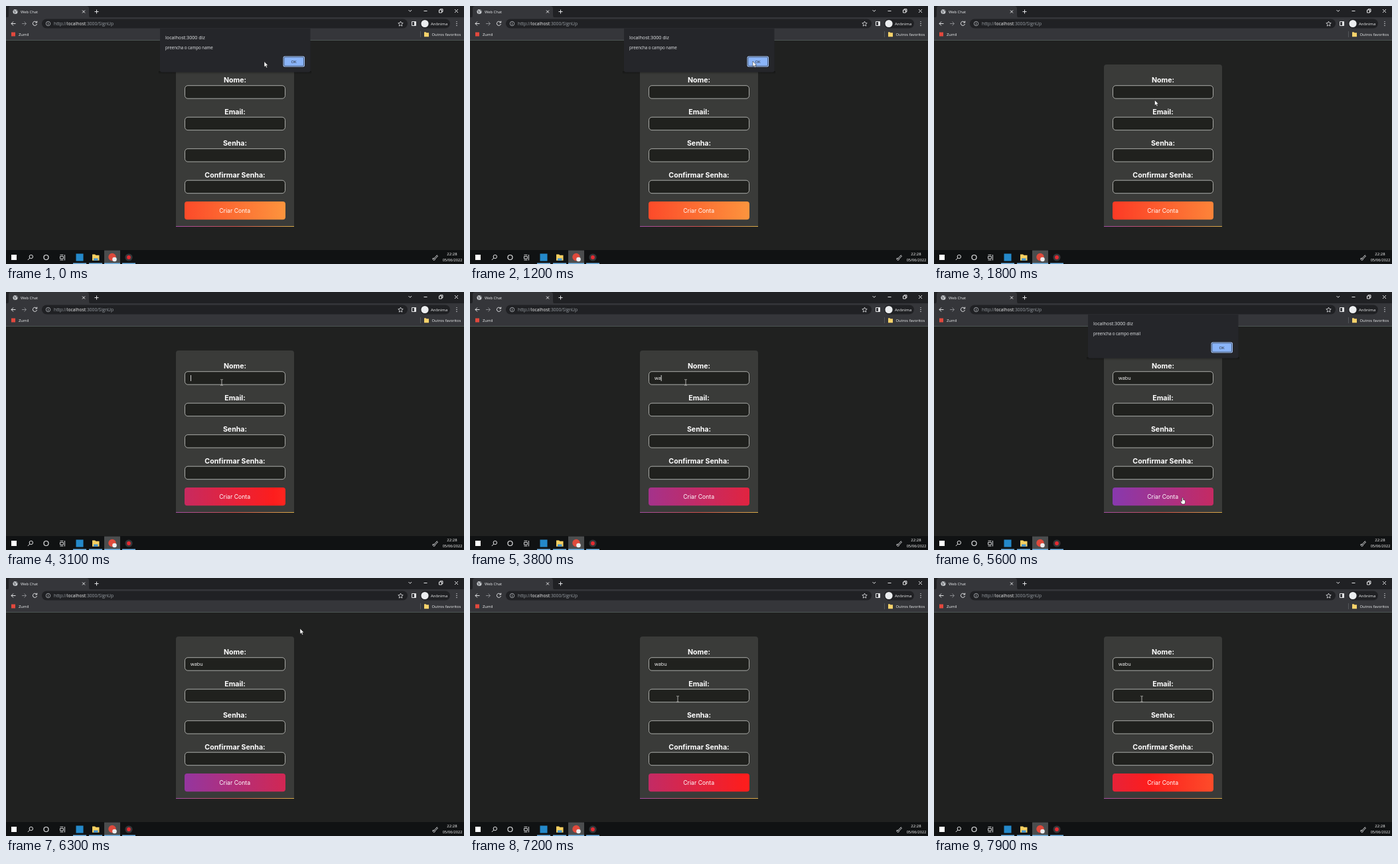
An HTML page for the animation above (8000 ms loop, 690 by 388 pixels).

```html
<!DOCTYPE html>
<html lang="pt-BR">
<head>
<meta charset="utf-8">
<title>Web Chat</title>
<style>
  html, body { margin: 0; width: 100%; height: 100%; overflow: hidden; background: #202120; }
  svg { display: block; width: 690px; height: 388px; font-family: "Open Sans", "Noto Sans", sans-serif; }
  .mid { text-anchor: middle; }
  .label { font: 700 10.6px Inter, sans-serif; fill: #fff; text-anchor: middle; }
  .icon { fill: none; stroke: #e3e4e6; stroke-width: 1; }
</style>
</head>
<body>
<svg viewBox="0 0 690 388" xmlns="http://www.w3.org/2000/svg">
  <defs>
    <linearGradient id="sweep" gradientUnits="userSpaceOnUse" y1="0" y2="0">
      <stop offset="0" stop-color="#833ab4"/>
      <stop offset=".5" stop-color="#fd1d1d"/>
      <stop offset="1" stop-color="#fcb045"/>
    </linearGradient>
    <linearGradient id="rim">
      <stop offset="0" stop-color="#a84fa6"/>
      <stop offset=".5" stop-color="#d0504c"/>
      <stop offset="1" stop-color="#dcae48"/>
    </linearGradient>
    <linearGradient id="shade" x2="0" y2="1">
      <stop offset="0" stop-color="#000" stop-opacity=".35"/>
      <stop offset="1" stop-color="#000" stop-opacity="0"/>
    </linearGradient>
  </defs>

  <rect width="690" height="388" fill="#202120"/>

  <!-- tab strip -->
  <rect width="690" height="18" fill="#202124"/>
  <path d="M1 17.5Q4 17.5 4 14V4Q4 0 8 0H121Q125 0 125 4V14Q125 17.5 128 17.5Z" fill="#35363a"/>
  <circle cx="14" cy="8.5" r="3.6" fill="#c3c6ca"/>
  <path d="M11.5 7L14 8.2L13 11M15 5.5L17 8" fill="none" stroke="#4a4b4f"/>
  <text x="22" y="10.6" font-size="5.8" fill="#e8eaed">Web Chat</text>
  <path class="icon" d="M115 6.5l4 4m0-4l-4 4M133.500 8.500h6m-3-3v6"/>
  <path class="icon" stroke-width=".8" d="M606.500 6l2.300 2.300l2.300-2.300M629.500 7.500h5M652.500 6h4v4h-4zM654 6V4.700h4V8.700h-1.500M676 5l5 5m0-5l-5 5"/>

  <!-- toolbar -->
  <rect y="17" width="690" height="34.500" fill="#35363a"/>
  <rect y="51" width="690" height="1" fill="#4c5553"/>
  <path class="icon" d="M14.500 26.500H8m3-3l-3 3l3 3"/>
  <path class="icon" style="stroke:#85878b" d="M24 26.500h6.500m-3-3l3 3l-3 3"/>
  <path class="icon" d="M46 24.500a3.100 3.100 0 1 0 .5 2.500M46.700 22.600v2.400h-2.400"/>
  <rect x="54" y="19.500" width="551" height="14" rx="7" fill="#202124"/>
  <circle class="icon" style="stroke-width:.8;stroke:#bdc1c6" cx="63.500" cy="26.500" r="3.200"/>
  <path d="M63.500 26v2.300M63.500 24.500v.8" stroke="#bdc1c6" stroke-width=".8"/>
  <text x="72" y="28.900" font-size="6.750" fill="#9aa0a6">http://<tspan fill="#f1f2f3">localhost</tspan>:3000/SignUp</text>
  <path class="icon" style="stroke-width:.8" d="M594.500 23l1.100 2.400l2.600.3l-2 1.800l.6 2.600l-2.300-1.300l-2.300 1.300l.6-2.600l-2-1.800l2.600-.3z"/>
  <path class="icon" d="M611.500 23.500h6v6h-6z"/><path d="M615 23.500h2.500v6H615z" fill="#e3e4e6"/>
  <rect x="624" y="19.500" width="45" height="14" rx="7" fill="#202124"/>
  <circle cx="631" cy="26.500" r="5.600" fill="#eceef0"/>
  <text x="640" y="28.600" font-size="6" fill="#f1f2f3">Anônima</text>
  <path d="M679 23.600v.01M679 26.500v.01M679 29.400v.01" stroke="#e3e4e6" stroke-width="1.400" stroke-linecap="round"/>
  <rect x="8" y="39.500" width="6" height="6" fill="#e2483d"/>
  <text x="19" y="44.600" font-size="5.900" fill="#f1f2f3">Zumil</text>
  <path d="M624.500 38v9" stroke="#5c5e63" stroke-width=".8"/>
  <path d="M630 39.200h2.500l1 1h3.500v6h-7z" fill="#f7d36b"/>
  <text x="641.500" y="44.600" font-size="5.800" fill="#f1f2f3">Outros favoritos</text>

  <!-- form card -->
  <path d="M256 332V92Q256 88 260 88H430Q434 88 434 92V332Z" fill="#3a3b39"/>
  <rect x="256" y="331" width="178" height="1" fill="url(#rim)"/>
  <g id="fields"></g>
  <rect x="269" y="294" width="152" height="27.300" rx="4" fill="url(#sweep)"/>
  <text class="mid" x="344.700" y="310.900" font-size="8.700" fill="#fff" style="font-family:Inter,sans-serif">Criar Conta</text>
  <text id="typed" x="278" y="132.200" font-size="7.300" fill="#fff"></text>
  <rect id="caret" y="125" width=".8" height="9" fill="#fff"/>

  <!-- alert box -->
  <g id="alert">
    <rect x="230" y="98" width="230" height="5" fill="url(#shade)"/>
    <path d="M232 34H458.500V96.500Q458.500 99.500 455.500 99.500H235Q232 99.500 232 96.500Z" fill="#25262a"/>
    <text x="240" y="50.300" font-size="7.200" fill="#e8eaed">localhost:3000 diz</text>
    <text id="message" x="240" y="64.800" font-size="6.200" fill="#e8eaed"></text>
    <rect x="417.500" y="75.500" width="32.500" height="16" rx="2.500" fill="#a9c8fa"/>
    <rect x="418.500" y="76.500" width="30.500" height="14" rx="1.800" fill="#30435f"/>
    <rect x="419.300" y="77.300" width="28.900" height="12.400" rx="1.300" fill="#8ab4f8"/>
    <text class="mid" x="433.500" y="85.500" font-size="5.800" fill="#202124">OK</text>
  </g>

  <!-- taskbar -->
  <rect y="367" width="690" height="21" fill="#101213"/>
  <rect x="8" y="374" width="8" height="8" fill="#fff"/>
  <circle class="icon" cx="37.800" cy="377" r="2.700"/><path class="icon" d="M35.800 379l-3 3"/>
  <circle class="icon" style="stroke-width:1.200" cx="60.500" cy="378" r="3.500"/>
  <path class="icon" style="stroke-width:.9" d="M81.500 376.500h5v3.500h-5zM81.500 374.300h5M81.500 382h5M88.500 374v8.500"/>
  <rect x="105.500" y="372.500" width="11" height="11" fill="#2489ca"/>
  <path d="M130 373.500h4l1.500 1.200h5v8h-10.500z" fill="#f6cf60"/><path d="M132 379.500h6.500v3.200H132z" fill="#3f92d2"/>
  <rect x="148" y="367.500" width="24" height="20.500" fill="#4b4d4e"/>
  <circle cx="160" cy="377.500" r="5.700" fill="#df4a3c"/>
  <circle cx="163.500" cy="381" r="3.300" fill="#eceef0"/>
  <circle cx="185" cy="378" r="5.600" fill="#34373a"/><circle cx="185" cy="378" r="2.900" fill="#e52b32"/>
  <path d="M101 387.300h20M125 387.300h20M148 387.300h24M175 387.300h20" stroke="#76b9ed" stroke-width="1.400"/>
  <path class="icon" style="stroke-width:.9" d="M645 379.500l4.200-4.700l1.300 1.200l-4.200 4.700zM645 379.500q-3-1-2 1.500t3.500 .5"/>
  <g class="mid" fill="#fff">
    <text x="672" y="375.400" font-size="6">22:28</text>
    <text x="672.500" y="384.200" font-size="5.600">05/06/2022</text>
  </g>

  <!-- pointers -->
  <g id="pointer">
    <path id="arrow" d="M0 0V8.200L1.900 6.500L3.200 9.400L4.600 8.800L3.300 6H5.800Z" fill="#fff" stroke="#111" stroke-width=".5"/>
    <path id="beam" d="M-1.800-4.300H-.5L0-3.800L.5-4.300H1.800M0-3.800V3.800M-1.800 4.300H-.5L0 3.800L.5 4.300H1.800" fill="none" stroke="#d6d6d2" stroke-width=".8"/>
    <path id="hand" d="M-1-4.300Q0-5.400 .8-4.300V-1.300Q2-1.900 2.500-.9Q3.700-1.200 4-.2V2.600Q3.800 4 3 5H-1Q-2.200 3-3.300 1Q-2.800-.3-1 1Z" fill="#fff" stroke="#222" stroke-width=".6"/>
  </g>
</svg>
<script>
const LOOP = 8000;
const NAME = "wabu";
const el = id => document.getElementById(id);
const show = (id, on) => el(id).setAttribute("visibility", on ? "visible" : "hidden");

el("fields").innerHTML = ["Nome:", "Email:", "Senha:", "Confirmar Senha:"].map((label, i) => {
  const y = i * 47.5;
  return `<text class="label" x="345" y="${115.4 + y}">${label}</text>
    <rect x="269.500" y="${119.7 + y}" width="151" height="19.500" rx="4.500" fill="#20211e" stroke="#b9bab7" stroke-width=".9"/>`;
}).join("");

// The screen repaints only at these times.
const ticks = [0, 500, 700, 800, 1000, 1200, 1400, 1800, 2000, 2100, 2300, 2400, 2700, 3000, 3100,
  3300, 3600, 3800, 3900, 4000, 4100, 4200, 4400, 4500, 4600, 4800, 5000, 5200, 5300, 5400, 5500,
  5600, 5700, 5800, 5900, 6000, 6100, 6200, 6300, 6600, 6800, 7000];
for (let t = 7200; t < LOOP; t += 100) ticks.push(t);

// Share of the gradient hidden to the left of the button.
const slide = [[0, .655], [1400, .655], [1800, .6], [3100, .28], [3800, .135], [4500, .05],
  [5200, .02], [6100, .02], [6300, .07], [7900, .41]];

// time, x, y, shape
const path = [[0, 389, 83.5, "arrow"], [500, 419, 81, "arrow"], [700, 423, 82, "arrow"],
  [800, 426, 83, "arrow"], [1800, 332.5, 141.5, "arrow"], [2000, 325, 136, "beam"],
  [4400, 340, 185, "beam"], [4500, 358, 258, "arrow"], [4600, 372, 309, "hand"],
  [4800, 374.5, 314, "hand"], [5700, 388, 268, "arrow"], [5800, 412, 180, "arrow"],
  [5900, 434, 104, "arrow"], [6000, 443, 80, "arrow"], [6100, 443, 76, "arrow"],
  [6600, 420, 97, "arrow"], [6800, 340, 182, "beam"], [7000, 313, 182, "beam"]];

const last = (list, test) => list.filter(test).pop();

function lerp(keys, t) {
  const i = keys.findIndex(k => k[0] > t);
  if (i < 0) return keys[keys.length - 1][1];
  const [a, b] = [keys[i - 1], keys[i]];
  return a[1] + (b[1] - a[1]) * (t - a[0]) / (b[0] - a[0]);
}

function caretOn(t) {
  if (t < 2100 || t >= 5300) return false;
  if (t < 3600) return t < 2700 || t >= 3000;
  return t < 4800 || t >= 5200;
}

function draw(now) {
  const t = last(ticks, k => k <= now);

  const left = 269 - lerp(slide, t) * 608;
  el("sweep").setAttribute("x1", left);
  el("sweep").setAttribute("x2", left + 608);

  const count = t < 3600 ? 0 : Math.min(NAME.length, 1 + Math.floor((t - 3600) / 200));
  const typed = el("typed");
  typed.textContent = NAME.slice(0, count);
  el("caret").setAttribute("x", 278 + (count ? typed.getComputedTextLength() : 0));
  show("caret", caretOn(t));

  show("alert", t < 1400 || (t >= 5300 && t < 6200));
  el("message").textContent = "preencha o campo " + (t < 1400 ? "name" : "email");

  const [, x, y, shape] = last(path, p => p[0] <= t);
  el("pointer").setAttribute("transform", `translate(${x} ${y})`);
  for (const id of ["arrow", "beam", "hand"]) show(id, id === shape);
}

const start = performance.now();
function frame() {
  draw((performance.now() - start) % LOOP);
  requestAnimationFrame(frame);
}
frame();
</script>
</body>
</html>
```
